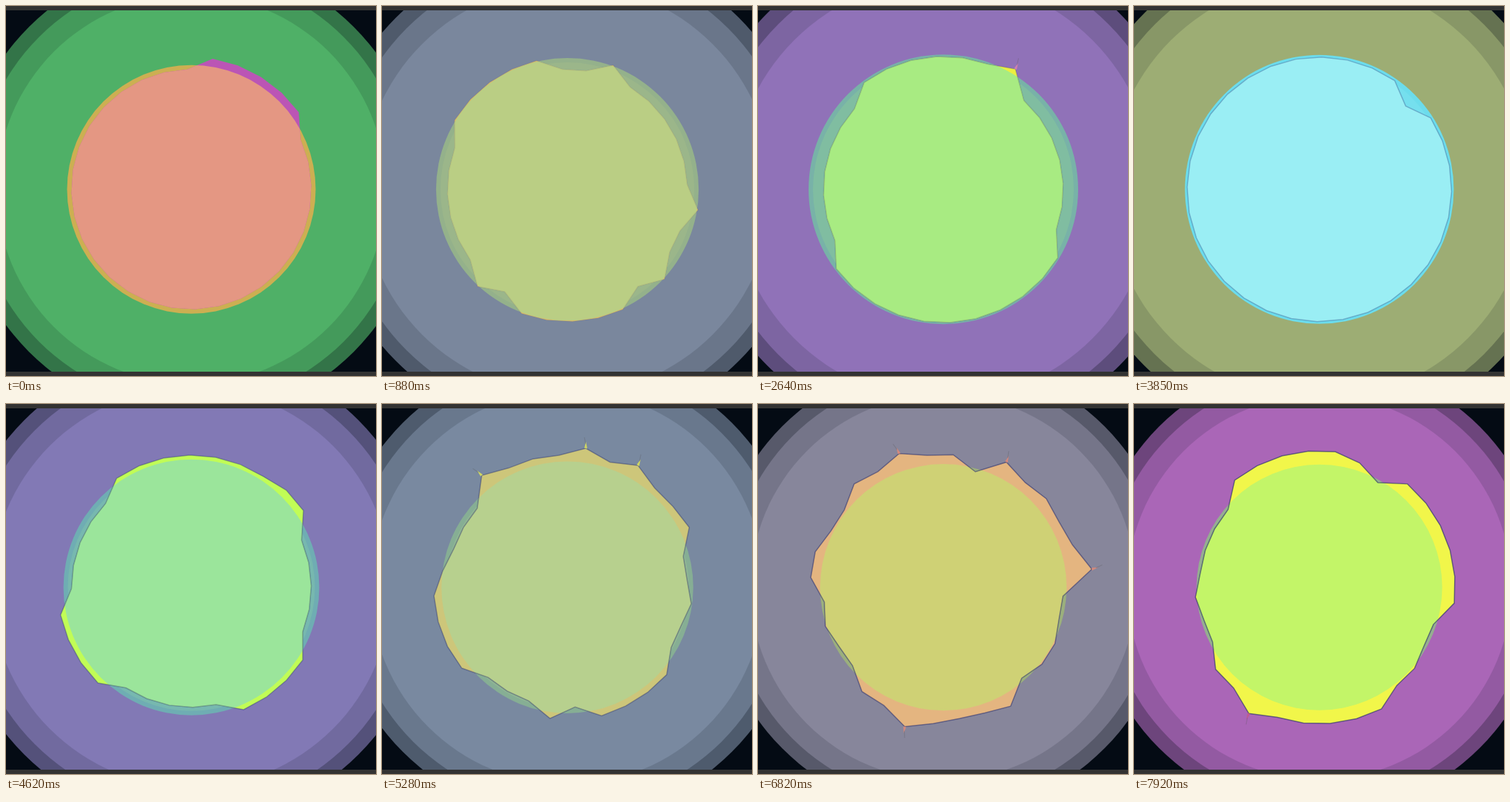
An HTML page with a canvas for the animation above (8000 ms loop, 512 px wide and 512 px high).

```html
<!DOCTYPE html>
<html>
<head>
<meta charset="utf-8">
<style>
html, body { margin: 0; height: 100%; overflow: hidden; background: #333; }
canvas { display: block; }
</style>
</head>
<body>
<canvas id="stage" width="512" height="512"></canvas>
<script>
const ctx = document.getElementById('stage').getContext('2d');
const STEP = 110, LOOP = 8000, LAST = 72;
const COUNT = 32, GAP = 360 / COUNT, REST = 166, CX = 256.5, CY = 253.7;

// Key poses. Colours: backdrop, circle, wave, overlap, spark.
// Ridges lift vertices (first, last, radius) of the resting wave, clockwise from the top.
const poses = [
  { at: 0, size: 172, colors: ['#4fb067', '#ccaf52', '#bb55b5', '#e49783', '#bb55b5'],
    ridges: [[0, 4, 183]] },
  { at: 12, size: 186.5, colors: ['#9072b8', '#78b2a8', '#edee40', '#a5e985', '#d080b0'],
    ridges: [[-5, 1, 183], [9, 20, 183]] },
  { at: 24, size: 186.5, colors: ['#9072b8', '#78b2a8', '#edee40', '#a8eb82', '#d080b0'],
    ridges: [[-4, 1, 184], [2, 2, 194], [10, 20, 184.5]] },
  { at: 35, size: 186, colors: ['#9dad74', '#6cdcec', '#70e2f0', '#9aeef4', '#70e2f0'],
    ridges: [[-27, 3, 183]] },
  { at: 42, size: 177, colors: ['#8279b5', '#6fadb3', '#c1fc56', '#9be59b', '#c1fc56'],
    ridges: [[-3, 3, 183], [4, 5, 188], [11, 14, 184], [20, 23, 185]] },
  { at: 55, size: 171, colors: ['#6f9c87', '#a0b070', '#db88a5', '#d8b77e', '#e0aa70'],
    ridges: [[-4, 5, 184], [-3, -3, 195], [1, 1, 194], [3, 3, 195], [6, 6, 207], [7, 9, 173],
      [12, 17, 183], [21, 24, 184], [25, 26, 174]] },
  { at: 72, size: 170, colors: ['#aa66b7', '#95ae90', '#f1f64a', '#c3f568', '#c05a90'],
    ridges: [[-4, 0, 189], [1, 1, 181], [3, 8, 188], [11, 12, 173], [13, 17, 189], [18, 18, 200],
      [19, 20, 183], [23, 23, 172]] }
];

const turn = step => 9.3 + 1.37 * step;
const mix = (a, b, u) => a + (b - a) * u;
const random = n => { const x = Math.sin(n * 91.7 + 4.3) * 43758.5; return x - Math.floor(x); };
const channels = hex => [1, 3, 5].map(i => parseInt(hex.slice(i, i + 2), 16));
const mixColor = (a, b, u) => {
  const to = channels(b);
  return `rgb(${channels(a).map((v, i) => Math.round(mix(v, to[i], u)))})`;
};

// Build each wave on vertices that turn with the ring.
for (const pose of poses) {
  const shift = Math.floor((turn(pose.at) + 1) / GAP);
  pose.wave = Array(COUNT).fill(REST);
  for (const [first, last, r] of pose.ridges) {
    for (let k = first; k <= last; k++) pose.wave[(k - shift + 2 * COUNT) % COUNT] = r;
  }
}

function disc(r, color, alpha = 1) {
  ctx.globalAlpha = alpha;
  ctx.fillStyle = color;
  ctx.beginPath();
  ctx.arc(CX, CY, r, 0, 7);
  ctx.fill();
  ctx.globalAlpha = 1;
}

function spark(angle, r, color) {
  ctx.save();
  ctx.translate(CX, CY);
  ctx.rotate(angle);
  ctx.fillStyle = color;
  ctx.beginPath();
  ctx.moveTo(-2, -r);
  ctx.lineTo(2, -r);
  ctx.lineTo(-1, -r - 9);
  ctx.fill();
  ctx.strokeStyle = 'rgba(85, 85, 85, 0.3)';
  ctx.lineWidth = 1;
  ctx.beginPath();
  ctx.moveTo(-1, -r - 6);
  ctx.lineTo(-4, -r - 15);
  ctx.stroke();
  ctx.restore();
}

function draw(step) {
  let i = 0;
  while (i < poses.length - 2 && step >= poses[i + 1].at) i++;
  const a = poses[i], b = poses[i + 1], u = (step - a.at) / (b.at - a.at);
  const size = mix(a.size, b.size, u);
  const [back, circle, wave, overlap, glow] = a.colors.map((c, n) => mixColor(c, b.colors[n], u));
  // Every vertex jumps to its next level at its own moment.
  const points = a.wave.map((r, j) => ({
    r: u > 0.02 + 0.96 * random(i * COUNT + j) ? b.wave[j] : r,
    angle: (turn(step) + j * GAP) * Math.PI / 180
  }));

  ctx.fillStyle = '#333';
  ctx.fillRect(0, 0, 512, 512);
  ctx.save();
  ctx.beginPath();
  ctx.rect(0, 6, 512, 500);
  ctx.clip();
  ctx.fillStyle = '#040b14';
  ctx.fillRect(0, 0, 512, 512);
  disc(size * 1.848, back, 0.64);
  disc(size * 1.733, back, 0.64);
  disc(size * 1.565, back);
  disc(size, circle);
  disc(size - 6, overlap, 0.18);

  const shape = new Path2D();
  for (const p of points) shape.lineTo(CX + p.r * Math.sin(p.angle), CY - p.r * Math.cos(p.angle));
  shape.closePath();
  ctx.fillStyle = wave;
  ctx.fill(shape);
  ctx.save();
  ctx.clip(shape);
  disc(size, overlap);
  ctx.restore();
  // The outline darkens as the wave grows livelier.
  ctx.strokeStyle = `rgba(30, 40, 110, ${0.6 * step / LAST})`;
  ctx.lineWidth = 1.5;
  ctx.stroke(shape);
  for (const p of points) if (p.r > 193) spark(p.angle, p.r, glow);
  ctx.restore();
}

const start = performance.now();
function tick() {
  const time = (performance.now() - start) % LOOP;
  draw(Math.min(LAST, Math.floor(time / STEP)));
  requestAnimationFrame(tick);
}
tick();
</script>
</body>
</html>
```
